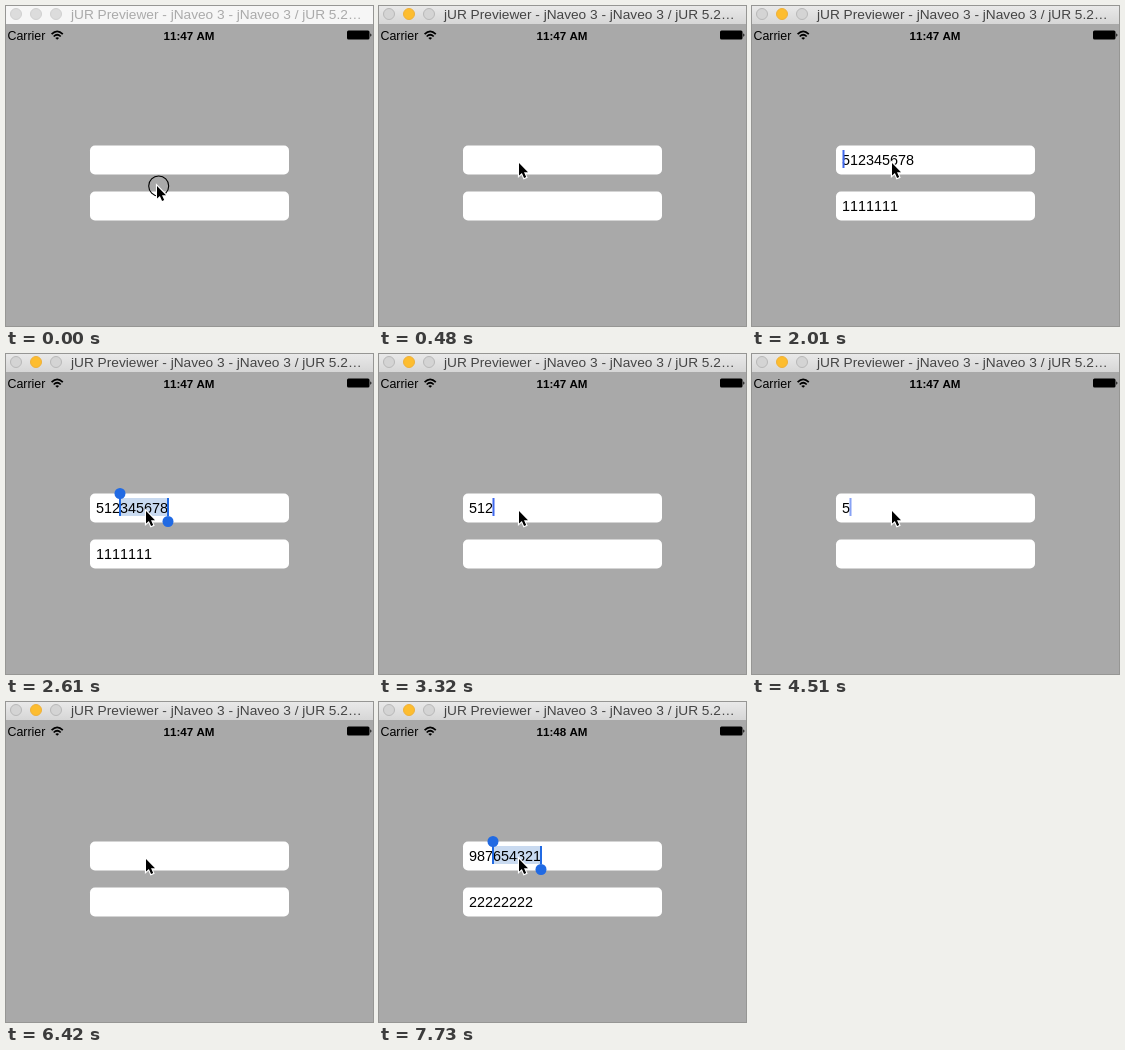
An HTML page for the animation above (8 s loop, 367x320 px).

```html
<!DOCTYPE html>
<html lang="en">
<head>
<meta charset="utf-8">
<style>
  html, body { margin: 0; width: 100%; height: 100%; overflow: hidden; background: #a9a9a9; }
  svg { display: block; font-family: "Liberation Sans", Arial, sans-serif; font-kerning: none; }
  .field { font-size: 14.4px; }
</style>
</head>
<body>
<svg width="367" height="320" viewBox="0 0 367 320">
  <defs>
    <linearGradient id="chrome" x2="0" y2="1">
      <stop stop-color="#e9e9e9"/><stop offset="1" stop-color="#d6d6d6"/>
    </linearGradient>
  </defs>
  <rect width="367" height="320" fill="#a9a9a9"/>

  <rect id="bar" width="367" height="18"/>
  <g id="lights" stroke-width="1">
    <circle cx="10" cy="8" r="5.5"/>
    <circle id="minimize" cx="30" cy="8" r="5.5"/>
    <circle cx="50" cy="8" r="5.5"/>
  </g>
  <text id="title" x="65" y="13" font-size="13.7">jUR Previewer - jNaveo 3 - jNaveo 3 / jUR 5.2…</text>

  <text x="1.5" y="34" font-size="12.4">Carrier</text>
  <g fill="none" stroke="#000" stroke-width="1.7">
    <path d="M45.6 28.2 Q51.2 22.6 56.8 28.2M47.7 30.5 Q51.2 27 54.7 30.5"/>
    <path d="M51.2 33.8 L49.3 31.9 Q51.2 30.4 53.1 31.9Z" fill="#000" stroke="none"/>
  </g>
  <text id="clock" x="183" y="34" font-size="11.6" font-weight="bold" text-anchor="middle"></text>
  <rect x="341" y="24.5" width="22.5" height="9" rx="1.5"/>
  <path d="M364.3 27.2 Q366.6 29 364.3 30.8Z"/>

  <g fill="#fff">
    <rect x="84" y="139.5" width="199" height="29" rx="5"/>
    <rect x="84" y="185.5" width="199" height="29" rx="5"/>
  </g>
  <rect id="highlight" y="144" height="18" fill="#c9daf0"/>
  <text id="account" class="field" x="90" y="159"></text>
  <text id="secret" class="field" x="90" y="205"></text>
  <rect id="caret" y="144" width="2" height="18" fill="#4069ee"/>
  <g id="handles" fill="#216ae3">
    <g id="startHandle"><rect x="-1" y="144" width="2" height="18"/><circle cy="139.5" r="5.5"/></g>
    <g transform="translate(162)"><rect x="-1" y="144" width="2" height="18"/><circle cy="167.5" r="5.5"/></g>
  </g>

  <g id="pointer">
    <circle id="ring" cx="1.7" cy="0" r="10" fill="none" stroke="#000" stroke-width="1.1"/>
    <path d="M0 0V12.6L2.9 10L5.1 15L7.2 14.1L5 9.2H9Z" stroke="#fff" stroke-width="2.2" paint-order="stroke"/>
  </g>
</svg>
<script>
const LOOP = 8000, DIGIT = 8, LEFT = 90;
const FIRST = ["512345678", "1111111"], SECOND = ["987654321", "22222222"];
const $ = id => document.getElementById(id);

// Each step: time, then the values that change from there on.
const steps = [
  [0, { active: false, ring: true, x: 151, y: 180, clock: "11:47 AM",
        text: "", secret: "", caret: 0, alpha: 0, select: 0 }],
  [120, { active: true, ring: false }],
  [240, { x: 149, y: 173 }],
  [360, { x: 144, y: 163 }],
  [480, { x: 140, y: 157 }],
  [590, { ring: true }],
  [710, { ring: false }],
  [830, { alpha: 1 }],
  ...fadeOut(1310, 1420, 1540),
  [1780, { alpha: .6 }],
  [1900, { alpha: 1 }],
  [2010, { text: FIRST[0], secret: FIRST[1] }],
  [2130, { alpha: 0, select: 1 }],
  [2370, { select: 2 }],
  [2610, { select: 3 }],
  [3320, { ...typed(3), secret: "", select: 0 }],
  [3680, typed(2)],
  [3910, typed(1)],
  ...fadeOut(4510, 4630, 4750),
  [5230, { alpha: 1 }],
  [5710, typed(0)],
  ...fadeOut(6190, 6310, 6420),
  [6650, { text: SECOND[0], secret: SECOND[1], clock: "11:48 AM" }],
  [6770, { select: 1 }],
  [7010, { select: 2 }],
  [7730, { select: 3 }],
];

function typed(count) {
  return { text: FIRST[0].slice(0, count), caret: count, alpha: 1 };
}
function fadeOut(a, b, c) {
  return [[a, { alpha: .62 }], [b, { alpha: .25 }], [c, { alpha: 0 }]];
}
function set(id, attributes) {
  for (const name in attributes) $(id).setAttribute(name, attributes[name]);
}

function render(time) {
  const s = Object.assign({}, ...steps.filter(([at]) => at <= time).map(step => step[1]));
  const selectX = LEFT + s.select * DIGIT;

  set("bar", { fill: s.active ? "url(#chrome)" : "#f6f6f6" });
  set("lights", { fill: s.active ? "#d4d4d4" : "#dcdcdc", stroke: s.active ? "#b8b8b8" : "#d0d0d0" });
  set("minimize", s.active ? { fill: "#fdbd2f", stroke: "#eeb03a" }
                           : { fill: "#dcdcdc", stroke: "#d0d0d0" });
  set("title", { fill: s.active ? "#444" : "#aaa" });
  $("clock").textContent = s.clock;
  $("account").textContent = s.text;
  $("secret").textContent = s.secret;

  // The caret straddles the gap between digits but stays inside the text area.
  const caretX = Math.max(LEFT + .5, LEFT - .5 + s.caret * DIGIT);
  set("caret", { x: caretX, opacity: s.alpha });
  set("highlight", { x: selectX, width: s.select ? 162 - selectX : 0 });
  set("handles", { visibility: s.select ? "visible" : "hidden" });
  set("startHandle", { transform: `translate(${selectX})` });
  set("pointer", { transform: `translate(${s.x} ${s.y})` });
  set("ring", { visibility: s.ring ? "visible" : "hidden" });
}

const start = performance.now();
function frame() {
  render((performance.now() - start) % LOOP);
  requestAnimationFrame(frame);
}
frame();
</script>
</body>
</html>
```
